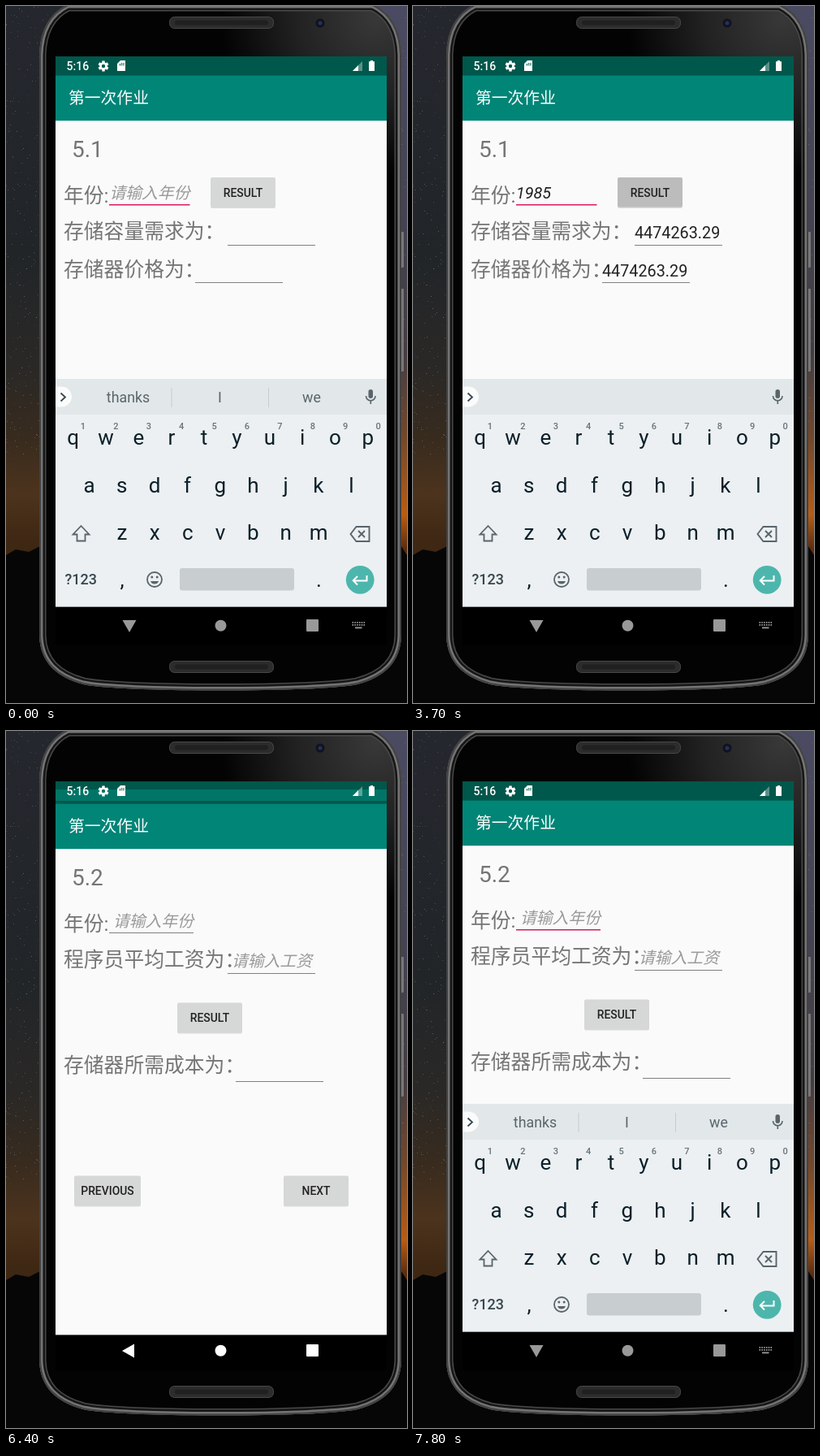
An HTML page for the animation above (8 s loop, 494x858 px).

```html
<!DOCTYPE html>
<html lang="zh-CN">
<head>
<meta charset="utf-8">
<style>
html, body { margin: 0; height: 100%; overflow: hidden; background: #000; }
svg { display: block; width: 494px; height: 858px; font-family: Roboto, "Noto Sans CJK SC", sans-serif; }
text { white-space: pre; }
</style>
</head>
<body>
<script>
const PINK = '#d81b60', GREY = '#757575', INK = '#0b1f29', DIM = '#59656b';

const rect = (x, y, w, h, fill, extra = '') =>
  `<rect x="${x}" y="${y}" width="${w}" height="${h}" fill="${fill}" ${extra}/>`;
const circle = (x, y, r, fill, extra = '') =>
  `<circle cx="${x}" cy="${y}" r="${r}" fill="${fill}" ${extra}/>`;
const text = (x, y, size, fill, str, extra = '') =>
  `<text x="${x}" y="${y}" font-size="${size}" fill="${fill}" ${extra}>${str}</text>`;
const mid = (x, y, size, fill, str, extra = '') =>
  text(x, y, size, fill, str, 'text-anchor="middle" ' + extra);
const path = (d, fill, extra = '') => `<path d="${d}" fill="${fill}" ${extra}/>`;
const line = (d, stroke, w) => path(d, 'none', `stroke="${stroke}" stroke-width="${w}"`);
const group = (id, body, extra = '') => `<g id="${id}" ${extra}>${body}</g>`;
const label = (y, str) => text(71, y, 24.8, GREY, str);
const hint = (x, y, str, id = '') => text(x, y, 19.8, '#999', str, `font-style="italic" id="${id}"`);
const rule = (x, y, w) => rect(x, y, w, 1, '#808080');
const button = (x, y, w, str, id = '') =>
  rect(x, y + 1, w, 37, '#000', 'rx="2" opacity=".13"') +
  rect(x, y, w, 36.5, '#d6d7d7', `rx="2" id="${id}"`) +
  mid(x + w / 2, y + 23.5, 13.9, '#212121', str, 'font-weight="500"');
const stops = list => list.map(([o, c]) => `<stop offset="${o}" stop-color="${c}"/>`).join('');
const gradient = (id, list) =>
  `<linearGradient id="${id}" x1="0" y1="0" x2="0" y2="1">${stops(list)}</linearGradient>`;

function scenery() {
  let seed = 7, stars = '';
  const rnd = () => (seed = seed * 16807 % 2147483647) / 2147483647;
  for (let i = 0; i < 700; i++) {
    const x = i % 4 ? rnd() * 70 : 445 + rnd() * 49;
    stars += rect(Math.floor(x), Math.floor(rnd() * 560), 1, 1, '#a0a4ac', `opacity="${(rnd() * .45).toFixed(2)}"`);
  }
  return rect(0, 0, 250, 858, 'url(#skyL)') + rect(250, 0, 244, 858, 'url(#skyR)') + stars +
    path('M0 676L12 669L28 672L42 665H487L494 676V858H0Z', '#070606');
}

function phone() {
  const body = 'M76 -2C55 8 42 28 41 60V775C42 808 62 826 95 835C140 845 388 845 433 835C466 826 486 808 487 775V60C486 28 473 8 452 -2Z';
  const rim = [[17, '#484848'], [14, '#161616'], [9, '#747474'], [4, '#424242']];
  const speaker = y =>
    rect(201.5, y, 128, 14, '#2c2c2c', 'rx="6" stroke="#484848"') + rect(208, y + 4, 115, 6, '#202020', 'rx="3"');
  return rect(486, 278, 4, 44, '#777', 'rx="1"') + rect(486, 348, 4, 102, '#777', 'rx="1"') +
    `<clipPath id="body"><path d="${body}"/></clipPath><g clip-path="url(#body)">` +
    path(body, '#030303') + path(body, 'url(#sheen)') +
    rim.map(([w, c]) => line(body, c, w)).join('') + '</g>' +
    speaker(13.5) + speaker(806.5) +
    circle(387, 21, 5.5, '#11131f') + circle(387, 21, 2.5, '#26305a');
}

function statusIcons() {
  let teeth = '';
  for (let i = 0; i < 6; i++) teeth += rect(118.3, 67.5, 3.4, 4, '#fff', `transform="rotate(${i * 60} 120 74)"`);
  return text(74.5, 79, 14, '#fff', '5:16', 'font-weight="500"') +
    teeth + circle(120, 74, 3.5, 'none', 'stroke="#fff" stroke-width="2.6"') +
    path('M141 67H147V80H137V71Z', '#fff') +
    line('M140.5 71V73.5M142.7 70V73.5M145 70V73.5', '#00574b', 1) +
    path('M439 68V80H427Z', '#fff', 'opacity=".35"') + path('M434 73V80H427Z', '#fff') +
    path('M449 67H452V68.3H454V80H447V68.3H449Z', '#fff');
}

function keyboard() {
  const key = (x, y, c) => mid(x, y, 26, INK, c);
  const row = (x, y, keys) => [...keys].map((c, i) => key((x + i * 40.35).toFixed(1), y, c)).join('');
  const digits = [...'1234567890'].map((c, i) =>
    mid((95 + i * 40.4).toFixed(1), 521, 11, '#66737a', c, 'font-weight="500"')).join('');
  const words = ['thanks', 'I', 'we'].map((w, i) => mid(150.5 + i * 113, 488, 17.8, DIM, w)).join('') +
    line('M204 470V494M323.5 470V494', '#c6ccd0', 1);
  return rect(61, 459, 408, 44, '#e2e7ea') + rect(61, 503, 408, 236.4, '#ecf0f2') +
    path('M61 468.5H68.5A12.5 12.5 0 0 1 68.5 493.5H61Z', '#fafbfb') +
    line('M67.5 476.5L73 481.5L67.5 486.5', '#37474f', 1.8) +
    group('words', words) +
    rect(446.5, 472, 5.5, 11, DIM, 'rx="2.7"') +
    line('M443.5 480A5.7 5.7 0 0 0 455 480M449.3 486V490', DIM, 1.6) +
    row(82.7, 540, 'qwertyuiop') + digits + row(102.5, 599, 'asdfghjkl') + row(143, 657, 'zxcvbnm') +
    line('M92.5 640L102.5 650.5H97.5V658.5H87.5V650.5H82.5Z', DIM, 1.8) +
    line('M424.5 650L431.5 641H447.5V659H431.5ZM434 646L442 654M442 646L434 654', DIM, 1.9) +
    text(72.5, 712, 18, '#37474f', '?123', 'font-weight="500"') +
    key(143, 715, ',') + key(385.5, 715, '.') +
    circle(183, 706, 9, 'none', `stroke="${DIM}" stroke-width="1.8"`) +
    circle(179.8, 703, 1.5, DIM) + circle(186.2, 703, 1.5, DIM) +
    path('M178 708H188A5.3 5.3 0 0 1 178 708Z', DIM) +
    rect(214, 692, 141, 27.5, '#c8cdd0', 'rx="3"') +
    circle(436.2, 706.3, 17.4, '#4db6ac') +
    line('M444.5 701V707.5H428M433 702L427.8 707.3L433 712.5', '#fff', 2);
}

function navIcons() {
  let dots = '';
  for (let r = 0; r < 2; r++)
    for (let c = 0; c < 6; c++) dots += `<rect x="${426.5 + c * 2.8}" y="${758 + r * 3}" width="1.6" height="1.8"/>`;
  dots += '<rect x="430" y="764.5" width="8.5" height="1.8"/>';
  return '<path id="back"/><circle cx="264.5" cy="762.8" r="7"/>' +
    '<rect x="370" y="755" width="15" height="15" rx="1"/>' + group('kbIcon', dots);
}

const page1 = text(81, 186, 28, GREY, '5.1') + label(242, '年份:') + label(286, '存储容量需求为：') +
  label(333, '存储器价格为：') + hint(127.5, 237, '请输入年份', 'hint1') +
  text(127, 237, 19.8, '#212121', '', 'font-style="italic" id="year"') +
  rect(127, 244, 99.5, 1.5, PINK) + rule(273, 294, 108) + rule(233, 340, 108) +
  group('values', text(273, 286, 19.8, '#212121', '4474263.29') + text(233, 333, 19.8, '#212121', '4474263.29')) +
  button(252, 211, 80, 'RESULT', 'result') + button(342, 543.5, 80, 'NEXT', 'next');

const page2 = text(81, 186, 28, GREY, '5.2') + label(242, '年份:') + label(286, '程序员平均工资为：') +
  label(416, '存储器所需成本为：') + hint(132, 237, '请输入年份') + hint(278, 286, '请输入工资') +
  rule(127, 244, 104) + group('focus2', rect(127, 244, 104, 1.5, PINK)) +
  rule(273, 294, 108) + rule(283, 427, 108) + button(211, 330.5, 80, 'RESULT') +
  button(84, 543.5, 82, 'PREVIOUS') + button(342, 543.5, 80, 'NEXT');

document.body.innerHTML = '<svg viewBox="0 0 494 858"><defs>' +
  gradient('skyL', [[0, '#25272e'], [.35, '#212528'], [.52, '#2a2826'], [.62, '#382b1e'], [.7, '#4c331d'], [.77, '#3e2713']]) +
  gradient('skyR', [[0, '#4a4b62'], [.3, '#434354'], [.5, '#453c42'], [.62, '#74482a'], [.73, '#b85c14'], [.78, '#5a2c0e']]) +
  '<radialGradient id="sheen" gradientUnits="userSpaceOnUse" cx="455" cy="15" r="190">' +
  stops([[0, '#383838'], [.5, '#222'], [1, '#030303']]) + '</radialGradient>' +
  '</defs>' + scenery() + phone() +
  rect(61, 62, 408, 725, '#000') + rect(61, 62, 408, 28, '#00574b') +
  group('tint', rect(61, 72, 408, 14, '#007567')) +
  group('win', rect(61, 141, 408, 598.4, '#fafafa') + rect(61, 85.6, 408, 55.6, '#008577') +
    text(77, 120, 19.8, '#fff', '第一次作业') + group('page1', page1) + group('page2', page2) +
    rect(127, 215, 2, 27, PINK, 'id="cursor"')) +
  statusIcons() +
  '<clipPath id="screen"><rect x="61" y="62" width="408" height="725"/></clipPath>' +
  `<g clip-path="url(#screen)">${group('kb', keyboard())}</g>` + group('nav', navIcons()) + '</svg>';

const $ = id => document.getElementById(id);
const set = (id, name, value) => $(id).setAttribute(name, value);
const show = (id, on) => set(id, 'visibility', on ? 'inherit' : 'hidden');
// last value whose start time has been reached
const at = (t, steps) => steps.reduce((v, [start, value]) => t >= start ? value : v, steps[0][1]);

const CURSOR = [[200, 700], [1000, 1600], [2400, 3400], [3900, 4300], [4700, 5200], [5700, 6400], [7300, 7800]];
const YEAR = [[0, ''], [2400, '19'], [2700, '198'], [2900, '1985']];
const CURSOR_X = [[0, 127.3], [2400, 148.8], [2700, 159.8], [2900, 170.2], [6400, 127]];
const RESULT = [[0, '#d6d7d7'], [3700, '#bcbcbc'], [3800, '#cacaca'], [3900, '#d6d7d7']];
const NEXT = [[0, '#d6d7d7'], [5700, '#d8d8d8'], [5800, '#c6c6c6'], [5900, '#bcbcbc'], [6100, '#d6d7d7']];
const KEYS = [[0, [0, 1]], [5100, [6, .9]], [5200, [20, .6]], [5300, [46, .15]], [5400, [48, 0]],
  [7600, [44, .6]], [7700, [10, .92]], [7800, [0, 1]]];
const NAV = [[0, '#999'], [5100, '#ddd'], [5300, '#fff'], [7400, '#ddd'], [7700, '#999']];

function draw(now) {
  const t = Math.floor(now % 8000 / 100) * 100;
  const second = t >= 6400, year = at(t, YEAR);
  show('page1', !second);
  show('page2', second);
  show('tint', t === 6400);
  set('win', 'transform', `translate(0 ${at(t, [[0, 0], [6400, 4], [6500, 1], [6600, 0]])})`);
  $('year').textContent = year;
  show('hint1', !second && !year);
  show('values', !second && t >= 3700);
  show('focus2', t >= 7300);
  set('result', 'fill', at(t, RESULT));
  set('next', 'fill', at(t, NEXT));
  set('cursor', 'x', at(t, CURSOR_X));
  show('cursor', CURSOR.some(([a, b]) => t >= a && t < b));
  const [dy, alpha] = at(t, KEYS);
  set('kb', 'transform', `translate(0 ${dy})`);
  set('kb', 'opacity', alpha);
  show('words', t < 2400 || second);
  set('nav', 'fill', at(t, NAV));
  set('back', 'd', t < 5200 || t >= 7400 ? 'M143.5 756H160.5L152 771Z' : 'M143 763L158 754.5V771.5Z');
  show('kbIcon', t < 5200 || t >= 7600);
}

const start = performance.now();
function tick() {
  draw(performance.now() - start);
  requestAnimationFrame(tick);
}
tick();
</script>
</body>
</html>
```
